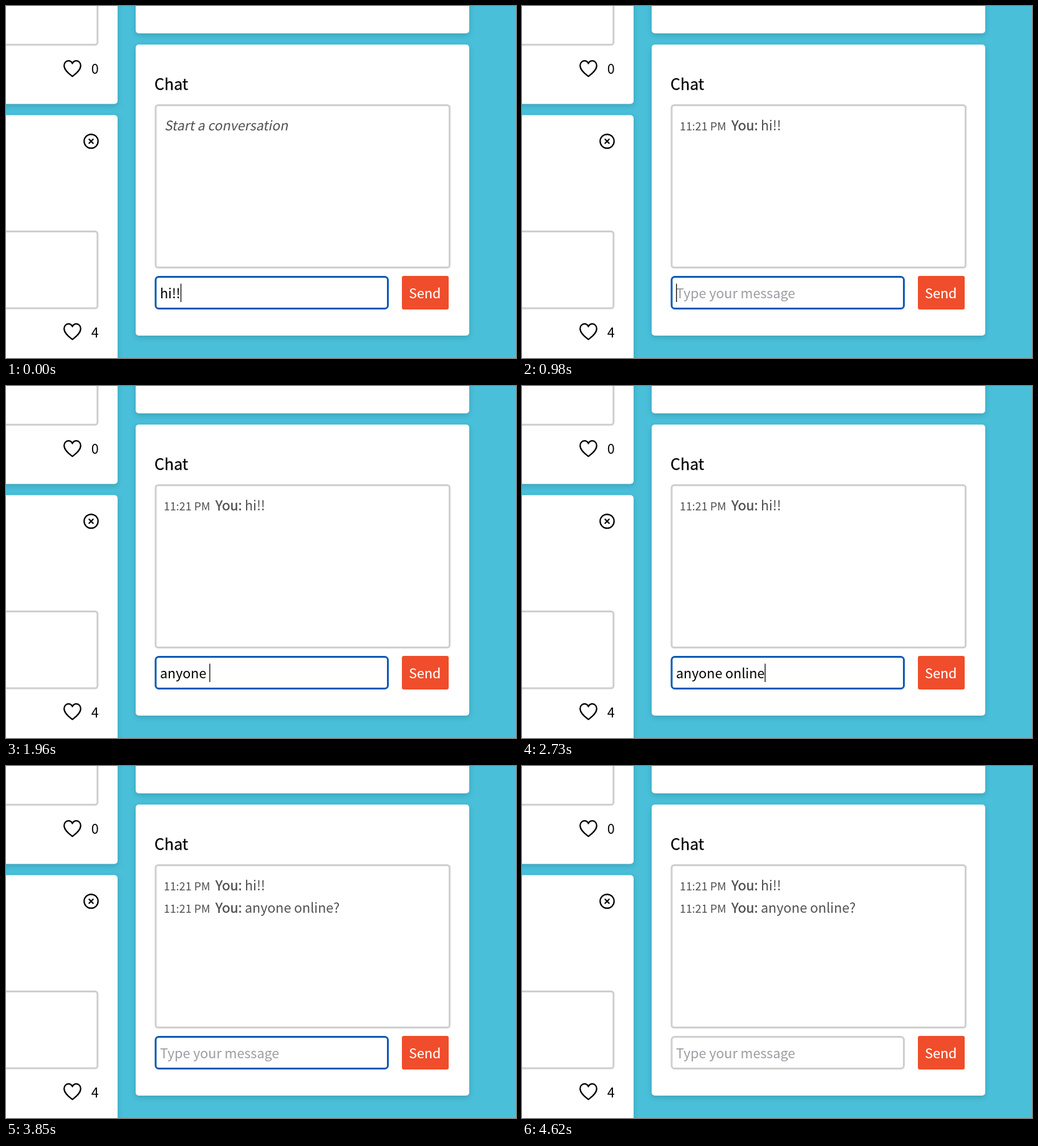
Recreate the animation shown at these times as an HTML page. Size 818 px wide and 566 px high, loop 8000 ms.

```html
<!DOCTYPE html>
<html lang="en">
<head>
<meta charset="utf-8">
<title>Chat</title>
<style>
html, body { margin: 0; width: 100%; height: 100%; overflow: hidden; background: #49bfd9; }
svg { display: block; }
text { font: 21.48px "Noto Sans CJK SC", "Noto Sans CJK JP", "Noto Sans CJK", "Open Sans", sans-serif; white-space: pre; }
.card { fill: #fff; filter: drop-shadow(0 3px 4px rgba(0, 0, 0, .15)); }
.box { fill: #fff; stroke: #cfcfcf; stroke-width: 3; }
.icon { fill: none; stroke: #000; stroke-width: 2.2; stroke-linecap: round; stroke-linejoin: round; }
.msg, .hint { fill: #505050; }
.msg .time { font-size: 17.9px; }
.msg .who { stroke: #505050; stroke-width: .45; }
.title { font-size: 25px; stroke: #000; stroke-width: .25; }
.ghost { fill: #9c9ca3; }
.send { fill: #fff; stroke: #fff; stroke-width: .2; }
</style>
</head>
<body>
<svg width="818" height="566" viewBox="0 0 818 566">
  <defs>
    <path id="heart" class="icon" d="M14.5 26.2 C10 22.5 1.2 16.5 1.2 8.7 C1.2 4.2 4.6 1.2 8.2 1.2 C11.2 1.2 13.4 3 14.5 5.6 C15.6 3 17.8 1.2 20.8 1.2 C24.4 1.2 27.8 4.2 27.8 8.7 C27.8 16.5 19 22.5 14.5 26.2 Z"/>
  </defs>

  <rect class="card" x="-20" y="-20" width="199" height="177.5" rx="5"/>
  <rect class="card" x="-20" y="175.5" width="199" height="420" rx="5"/>
  <rect class="card" x="208" y="-20" width="535" height="64" rx="5"/>
  <rect class="card" x="208" y="62" width="535" height="468" rx="5"/>

  <rect class="box" x="-20" y="-20" width="166.8" height="82.3" rx="4"/>
  <rect class="box" x="-20" y="362.5" width="166.8" height="123.5" rx="4"/>
  <use href="#heart" x="92" y="87"/>
  <use href="#heart" x="92" y="510"/>
  <text x="136.7" y="109">0</text>
  <text x="136.7" y="532.5">4</text>
  <g class="icon">
    <circle cx="136.5" cy="217.5" r="11.2"/>
    <path d="M133.3 214.3l6.4 6.4m0-6.4l-6.4 6.4"/>
  </g>

  <text class="title" x="238" y="135">Chat</text>
  <rect class="box" x="240" y="159.5" width="471.5" height="261" rx="4"/>
  <text class="hint" id="hint" transform="translate(254 200) skewX(-11)" style="font-size:21.3px">Start a conversation</text>
  <g class="msg" id="msg1">
    <text class="time" x="253" y="200">11:21 PM</text>
    <text class="who" x="336" y="200">You:</text>
    <text x="383" y="200">hi!!</text>
  </g>
  <g class="msg" id="msg2">
    <text class="time" x="253" y="236">11:21 PM</text>
    <text class="who" x="336" y="236">You:</text>
    <text x="383" y="236">anyone online?</text>
  </g>

  <rect class="box" id="field" x="240" y="435.5" width="372.5" height="51" rx="5"/>
  <text class="ghost" id="ghost" x="247" y="470">Type your message</text>
  <text id="typed" x="247" y="470"></text>
  <rect id="caret" y="446.5" width="1.5" height="29.5" fill="#222"/>

  <rect x="635" y="434" width="75" height="54" rx="3" fill="#ef4d2b"/>
  <text class="send" x="646.3" y="470">Send</text>
</svg>
<script>
const LOOP = 8000, BLUR = 4550, SENT = [140, 3080];
const LINE = "anyone online?";
// time of each keystroke of LINE
const KEYS = [1050, 1540, 1610, 1750, 1820, 1890, 1960, 2100, 2240, 2380, 2520, 2590, 2730, 2870];
// caret opacity from each time on
const BLINK = [[0, 1], [420, .5], [490, 0], [910, .5], [980, 1], [3360, .5], [3430, 0], [3990, 1], [4410, .5], [4480, 0]];

const el = id => document.getElementById(id);
const [hint, msg1, msg2, field, ghost, typed, caret] =
  ["hint", "msg1", "msg2", "field", "ghost", "typed", "caret"].map(el);
const show = (node, on) => node.style.visibility = on ? "visible" : "hidden";

function inputAt(t) {
  if (t < SENT[0]) return "hi!!";
  if (t >= SENT[1]) return "";
  return LINE.slice(0, KEYS.filter(k => k <= t).length);
}

function draw(t) {
  const text = inputAt(t);
  typed.textContent = text;
  show(ghost, !text);
  show(hint, t < SENT[0]);
  show(msg1, t >= SENT[0]);
  show(msg2, t >= SENT[1]);
  field.style.stroke = t < BLUR ? "#0d5cb6" : "#cfcfcf";
  caret.setAttribute("x", 247 + (text ? typed.getComputedTextLength() : 0));
  caret.style.opacity = BLINK.filter(b => b[0] <= t).pop()[1];
}

const start = performance.now();
function tick() {
  draw((performance.now() - start) % LOOP);
  requestAnimationFrame(tick);
}
tick();
</script>
</body>
</html>
```
